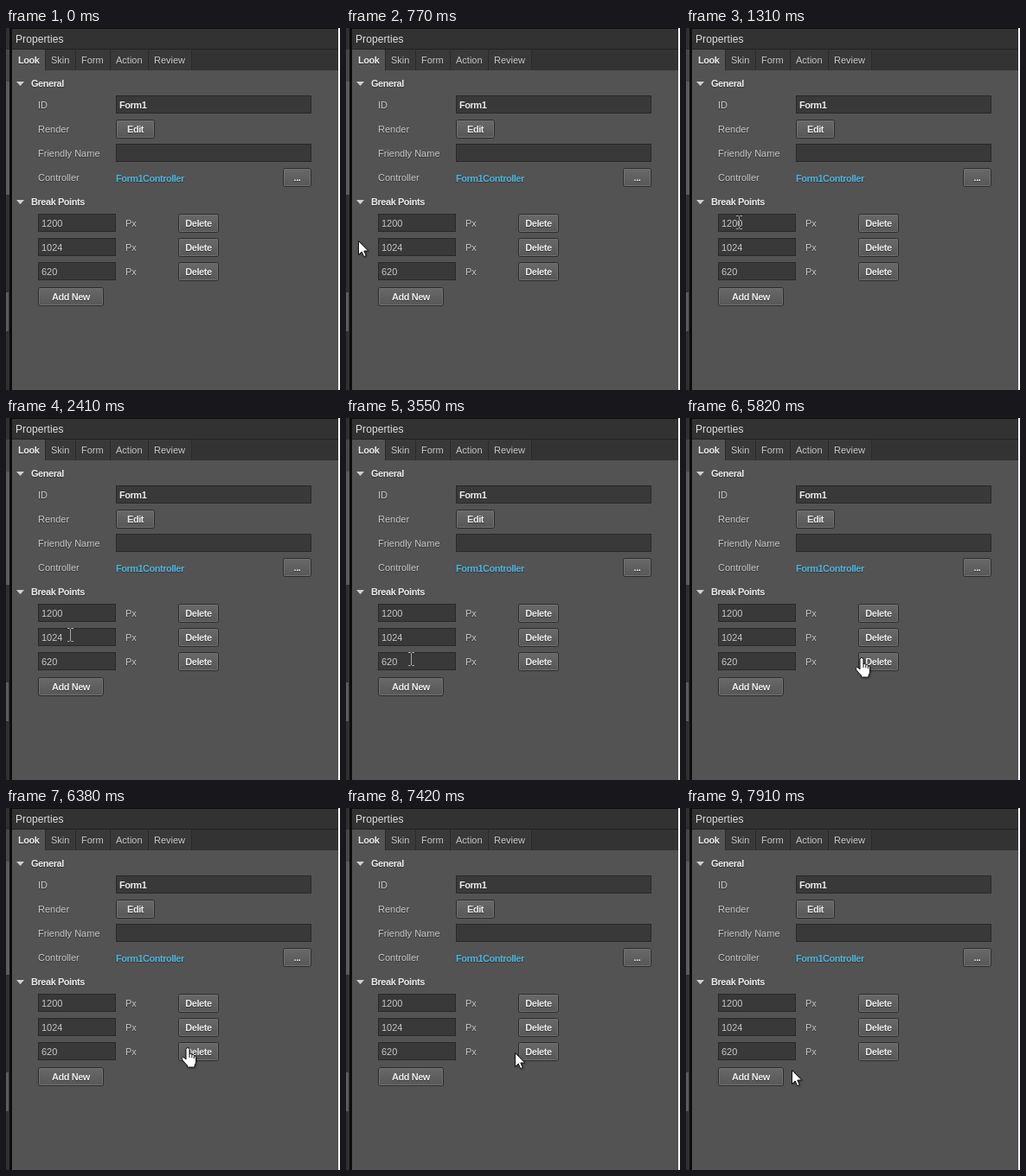
Write an HTML page that moves like this. It is 386 px wide and 419 px high and loops after 8 s.

```html
<!DOCTYPE html>
<html lang="en">
<head>
<meta charset="utf-8">
<title>Properties panel</title>
<style>
  html, body { margin: 0; width: 100%; height: 100%; overflow: hidden; background: #fff; }
  svg { display: block; width: 386px; height: 419px; }
  text { font: 11px "Liberation Sans", Arial, sans-serif; fill: #c8c8c8; white-space: pre; }
  .title { font-size: 12px; letter-spacing: .1px; fill: #e0e0e0; }
  .bold { font-weight: bold; letter-spacing: -.45px; fill: #ebebeb; }
  .link { fill: #4fb4dc; letter-spacing: -.5px; }
  .label, .bold { text-shadow: 0 1px 1px #333; }
  .mid { text-anchor: middle; }
  .field { fill: #393939; stroke: #292929; }
  .button { fill: url(#face); stroke: #2c2c2c; }
  .shine { fill: none; stroke: #707070; }
  .beam { fill: none; stroke: #ddd; mix-blend-mode: difference; }
  .pointer { fill: #fff; stroke: #111; filter: drop-shadow(1px 1px 1px rgba(0, 0, 0, .35)); }
  .line { fill: none; stroke: #111; }
  #cursor > g { display: none; }
  #cursor > .on { display: inline; }
</style>
</head>
<body>
<svg viewBox="0 0 386 419">
  <defs>
    <linearGradient id="face" x2="0" y2="1">
      <stop stop-color="#696969"/><stop offset="1" stop-color="#575757"/>
    </linearGradient>
  </defs>

  <rect width="384" height="419" fill="#535353"/>
  <!-- neighbouring pane and splitter -->
  <rect width="4" height="419" fill="#303030"/>
  <rect y="25" width="4" height="37" fill="#484848"/>
  <rect y="62" width="4" height="131" fill="#5c5c5c"/>
  <rect y="306" width="3" height="45" fill="#5c5c5c"/>
  <rect x="4" width="3" height="419" fill="#0c0c0c"/>
  <!-- title and tabs -->
  <rect x="7" width="377" height="25" fill="#323232"/>
  <rect x="4" width="380" height="1" fill="#0c0c0c"/>
  <rect x="7" y="24" width="377" height="1" fill="#222"/>
  <rect x="7" y="25" width="377" height="24" fill="#333"/>
  <rect x="45" y="25" width="169" height="24" fill="#393939"/>
  <rect x="7" y="25" width="38" height="24" fill="#535353"/>
  <path d="M45.5 25v24M80.5 25v24M120.5 25v24M164.5 25v24M214.5 25v24" stroke="#2a2a2a"/>
  <path d="M12 62h9l-4.5 5zM12 199h9l-4.5 5z" fill="#d0d0d0"/>
  <g id="panel"></g>

  <g id="cursor">
    <g id="beam"><path class="beam" d="M-3 -7.5h2.5l1 1 1-1H4M.5 -6.5V7M-3 7.5h2.5l1-1 1 1H4"/></g>
    <g id="arrow"><path class="pointer" d="M.5 .5V16.5L4.2 13 6.7 18.6 9.2 17.5 6.8 12H11.7Z"/></g>
    <g id="hand" transform="translate(-1)">
      <path class="pointer" d="M-2 1.5Q-2 -.5 0 -.5T2 1.5V6.5Q4.2 5.8 4.8 7.3 6.8 6.8 7.3 8.5 9.5 8.3 9.5 11V15Q9.5 17.5 8 20V22H-.5V20Q-3 17.5-6.2 13.5-7.3 11-5.3 10.4-3.8 10.4-2 13Z"/>
      <path class="line" d="M2 6v5M4.8 7.3v4M7.3 8.5V12"/>
    </g>
  </g>
</svg>
<script>
const panel = document.getElementById('panel');
const cursor = document.getElementById('cursor');
const LOOP = 8000;

function add(tag, attrs, content = '') {
  const node = document.createElementNS('http://www.w3.org/2000/svg', tag);
  for (const key in attrs) node.setAttribute(key, attrs[key]);
  node.textContent = content;
  panel.append(node);
}
const text = (x, y, content, cls = 'label') => add('text', { x, y, class: cls }, content);
const box = (x, y, width, height, cls, rx = 0) => add('rect', { x, y, width, height, rx, class: cls });

function field(x, y, w, value, cls = 'value') {
  box(x + .5, y + .5, w - 1, 20, 'field');
  text(x + 4, y + 15, value, cls);
}
function button(x, y, w, label) {
  box(x + .5, y + .5, w - 1, 21, 'button', 2);
  box(x + 1.5, y + 1.5, w - 3, 19, 'shine', 1);
  text(x + w / 2, y + 15, label, 'bold mid');
}

text(11, 17, 'Properties', 'title');
text(14, 41, 'Look', 'bold');
[['Skin', 52], ['Form', 87], ['Action', 127], ['Review', 171]].forEach(([name, x]) => text(x, 41, name));
text(29, 68, 'General', 'bold');
['ID', 'Render', 'Friendly Name', 'Controller'].forEach((name, i) => text(37, 93 + 28 * i, name));
field(127, 78, 226, 'Form1', 'bold');
button(127, 106, 45, 'Edit');
field(127, 134, 226, '');
text(127, 178, 'Form1Controller', 'bold link');
button(320, 162, 33, '...');
text(29, 205, 'Break Points', 'bold');
['1200', '1024', '620'].forEach((size, i) => {
  const y = 215 + 28 * i;
  field(37, y, 90, size);
  text(138, y + 15, 'Px');
  button(199, y, 47, 'Delete');
});
button(37, 300, 76, 'Add New');

const easeOut = p => 1 - (1 - p) ** 3;
const easeBoth = p => p * p * (3 - 2 * p);

// Each move: first and last change in ms, number of steps, easing, path points.
const moves = [
  [530, 1310, 14, easeBoth, [[-6, 255], [61, 225]]],
  [2040, 2410, 6, easeBoth, [[61, 225], [78, 255], [74, 251]]],
  [2940, 3550, 10, easeBoth, [[74, 251], [80, 270], [75, 279]]],
  [5280, 6060, 14, easeOut, [[75, 279], [207, 278]]],
  [6120, 6120, 1, easeOut, [[207, 278], [209, 278]]],
  [6380, 6380, 1, easeOut, [[209, 278], [211, 278]]],
  [7240, 7910, 11, easeBoth, [[211, 278], [122, 303]]]
];

function along(points, p) {
  const pos = p * (points.length - 1);
  const i = Math.min(Math.floor(pos), points.length - 2);
  return points[i].map((v, k) => Math.round(v + (points[i + 1][k] - v) * (pos - i)));
}

function place(time) {
  const move = moves.findLast(m => time >= m[0]);
  if (!move) return null;
  const [start, end, steps, ease, points] = move;
  const gap = (end - start) / (steps - 1) || 1;
  const step = Math.min(steps, Math.floor((time - start) / gap + 1e-6) + 1);
  return along(points, ease(step / steps));
}

function shapeAt(x, y) {
  const row = (y - 215) % 28;
  if (y < 215 || y > 293 || row > 22) return 'arrow';
  if (x >= 37 && x < 127) return 'beam';
  return x >= 199 && x < 246 ? 'hand' : 'arrow';
}

function draw(now) {
  const spot = place(now % LOOP);
  const shape = spot && shapeAt(...spot);
  for (const node of cursor.children) node.classList.toggle('on', node.id === shape);
  if (spot) cursor.setAttribute('transform', `translate(${spot})`);
}

const begin = performance.now();
(function frame() {
  draw(performance.now() - begin);
  requestAnimationFrame(frame);
})();
</script>
</body>
</html>
```
